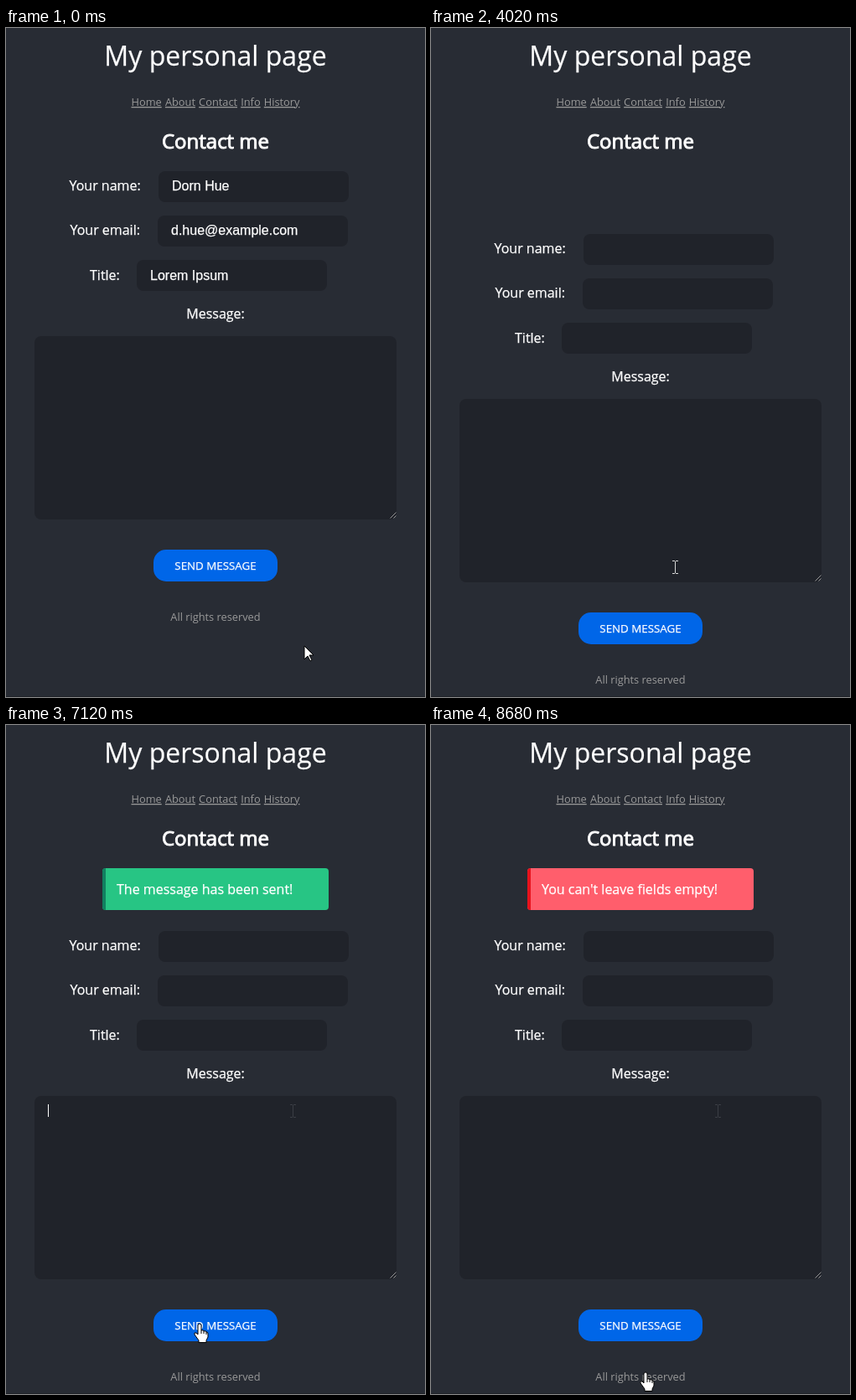
Write an HTML page that moves like this. It is 500 px wide and 799 px high and loops after 8750 ms.

```html
<!DOCTYPE html>
<html lang="en">
<head>
<meta charset="utf-8">
<title>Contact form</title>
<style>
  html, body { margin: 0; width: 100%; height: 100%; overflow: hidden; background: #282c34; }
  svg { display: block; font: 16px "Open Sans", sans-serif; fill: #fff; }
  text { stroke: #fff; stroke-width: .25; }
  .mid { text-anchor: middle; }
  .small { font-size: 12.8px; fill: #999; stroke: none; }
  .link { text-decoration: underline; }
  .bold { font-size: 24px; stroke-width: 1; }
  .field { fill: #20232a; }
  .value { font-family: "Liberation Sans", Arial, sans-serif; }
  .mono { font: 600 11.9px "Noto Sans Mono", monospace; white-space: pre; }
  .beam { fill: none; stroke: #d8d8d8; }
  .pointer { stroke: #000; stroke-linejoin: round; }
</style>
</head>
<body>
<svg width="500" height="799" viewBox="0 0 500 799">
  <rect width="500" height="799" fill="#282c34"/>
  <rect y="798" width="500" height="1" fill="#1e2127"/>
  <text class="mid" x="250" y="45" font-size="32">My personal page</text>
  <text class="mid" x="250" y="93"><tspan class="small link">Home</tspan> <tspan class="small link">About</tspan> <tspan class="small link">Contact</tspan> <tspan class="small link">Info</tspan> <tspan class="small link">History</tspan></text>
  <text class="mid bold" x="250" y="144">Contact me</text>

  <g id="alert">
    <rect id="alertBody" x="115" y="171" width="270" height="50" rx="4"/>
    <path id="alertEdge" d="M119 171a4 4 0 0 0-4 4v42a4 4 0 0 0 4 4z"/>
    <text id="alertText" x="132" y="202"></text>
  </g>

  <g id="form">
    <text x="75.5" y="194">Your name:</text>
    <text x="76.5" y="247">Your email:</text>
    <text x="100" y="301">Title:</text>
    <text class="mid" x="250" y="347">Message:</text>
    <rect class="field" x="182" y="171" width="227" height="37" rx="8"/>
    <rect class="field" x="181" y="224" width="227" height="37" rx="8"/>
    <rect class="field" x="156" y="277" width="227" height="37" rx="8"/>
    <rect class="field" x="34" y="368" width="432" height="219" rx="8"/>
    <path d="M458.5 585.5l7-7M462.5 585.5l3-3" stroke="#999" fill="none"/>
    <g id="values" class="value">
      <text x="198" y="194">Dorn Hue</text>
      <text x="197" y="247">d.hue@example.com</text>
      <text x="172" y="301">Lorem Ipsum</text>
    </g>
    <text id="message" class="mono" x="50" y="390"></text>
    <rect id="caret" y="378" width="1" height="15"/>
    <rect id="button" x="176" y="623" width="148" height="38" rx="15" fill="#0066e8"/>
    <text class="mid" x="250" y="647" font-size="13.333">SEND MESSAGE</text>
    <text class="mid small" x="250" y="708">All rights reserved</text>
  </g>

  <path id="trace" class="beam" style="stroke:#3b3e45" transform="translate(342.5 461)"/>
  <g id="cursor">
    <path id="arrow" class="pointer" d="M0 0v16l4-4 3 6 2-1-3-6h5z"/>
    <path id="hand" class="pointer" d="M-2 2a2 2 0 0 1 4 0v6q3-1 3 1q3-1 3 1q2-.5 2 2v4l-2 4v2.5h-9v-2.5l-5-7q-1-3 2-2l2 2zM2 8v4M5 9v3M8 10v3"/>
    <path id="beam" class="beam" transform="translate(.5 0)"/>
  </g>
</svg>
<script>
const LOOP = 8750, SENT = 4020, REJECTED = 7500, SHIFT = 75, FADE = 800;
const MESSAGE = 'Hello World!', TYPING = 1100, KEY_GAP = 130, CHAR = 7.15, BLINK = 500;
const TYPED = TYPING + KEY_GAP * (MESSAGE.length - 1);

const START = { x: 356, y: 738 };
const MOVES = [
  { from: 70, to: 460, x: 291, y: 437 },    // into the message box
  { from: 2950, to: 3260, x: 289, y: 634 }, // onto the button
  { from: 3400, to: 3780, x: 291, y: 644 },
  { from: 4850, to: 5360, x: 138, y: 197 }, // over the alert
  { from: 5360, to: 5740, x: 323, y: 493 }, // back into the message box
  { from: 6110, to: 6500, x: 440, y: 62 },  // up to the header
  { from: 6500, to: 7120, x: 231, y: 715 }, // onto the button again
  { from: 8450, to: 8680, x: 256, y: 773 }
];
const ALERTS = {
  sent: ['#27c584', '#118060', 'The message has been sent!'],
  rejected: ['#ff5e6c', '#e8121c', "You can't leave fields empty!"]
};

const $ = id => document.getElementById(id);
const show = (id, on) => $(id).setAttribute('visibility', on ? 'visible' : 'hidden');
const clamp = p => Math.min(1, Math.max(0, p));
const smooth = p => p * p * (3 - 2 * p);

for (const id of ['beam', 'trace']) $(id).setAttribute('d', 'M-3.5-7.5h3m1 0h3M0-7v14M-3.5 7.5h3m1 0h3');

// The CSS "ease" curve.
function ease(p) {
  const bezier = (u, c1, c2) => 3 * c1 * u * (1 - u) ** 2 + 3 * c2 * u * u * (1 - u) + u ** 3;
  let low = 0, high = 1;
  for (let i = 0; i < 20; i++) {
    const u = (low + high) / 2;
    if (bezier(u, .25, .25) < p) low = u; else high = u;
  }
  return bezier(low, .1, 1);
}

function mouseAt(t) {
  let { x, y } = START;
  for (const move of MOVES) {
    const k = smooth(clamp((t - move.from) / (move.to - move.from)));
    x += (move.x - x) * k;
    y += (move.y - y) * k;
  }
  return [Math.round(x), Math.round(y)];
}

function contains(rect, x, y) {
  const { x: left, y: top, width, height } = rect.getBBox();
  return x >= left && x <= left + width && y >= top && y <= top + height;
}

function cursorKind(x, y, t) {
  const formY = t < SENT ? y : y - SHIFT;
  if (t >= REJECTED || contains($('button'), x, formY)) return 'hand';
  const overField = [...document.querySelectorAll('.field')].some(field => contains(field, x, formY));
  return overField || t >= SENT && contains($('alertText'), x, y) ? 'beam' : 'arrow';
}

// Blinking restarts on focus and with every key.
function caretOn(t) {
  const blink = since => (t - since) % (2 * BLINK) < BLINK;
  if (t >= 360 && t < TYPING) return blink(360);
  if (t >= TYPING && t < 3500) return t < TYPED || blink(TYPED);
  return t >= 5890 && t < REJECTED && blink(5890);
}

function render(t) {
  const sent = t >= SENT, rejected = t >= REJECTED;
  $('form').setAttribute('transform', `translate(0 ${sent ? SHIFT : 0})`);
  show('values', !sent);

  const [body, edge, text] = rejected ? ALERTS.rejected : ALERTS.sent;
  $('alertBody').setAttribute('fill', body);
  $('alertEdge').setAttribute('fill', edge);
  $('alertText').textContent = text;
  $('alert').setAttribute('opacity', ease(clamp((t - (rejected ? REJECTED : SENT)) / FADE)));

  const keys = Math.floor((t - TYPING) / KEY_GAP) + 1;
  const typed = sent ? 0 : Math.min(MESSAGE.length, Math.max(0, keys));
  $('message').textContent = MESSAGE.slice(0, typed);
  $('caret').setAttribute('x', Math.round(50 + typed * CHAR));
  show('caret', caretOn(t));

  const [x, y] = mouseAt(t), kind = cursorKind(x, y, t);
  $('cursor').setAttribute('transform', `translate(${x} ${y})`);
  for (const id of ['arrow', 'hand', 'beam']) show(id, id === kind);
  show('trace', t >= 5740);
}

const began = performance.now();
function tick() {
  render((performance.now() - began) % LOOP);
  requestAnimationFrame(tick);
}
tick();
</script>
</body>
</html>
```
